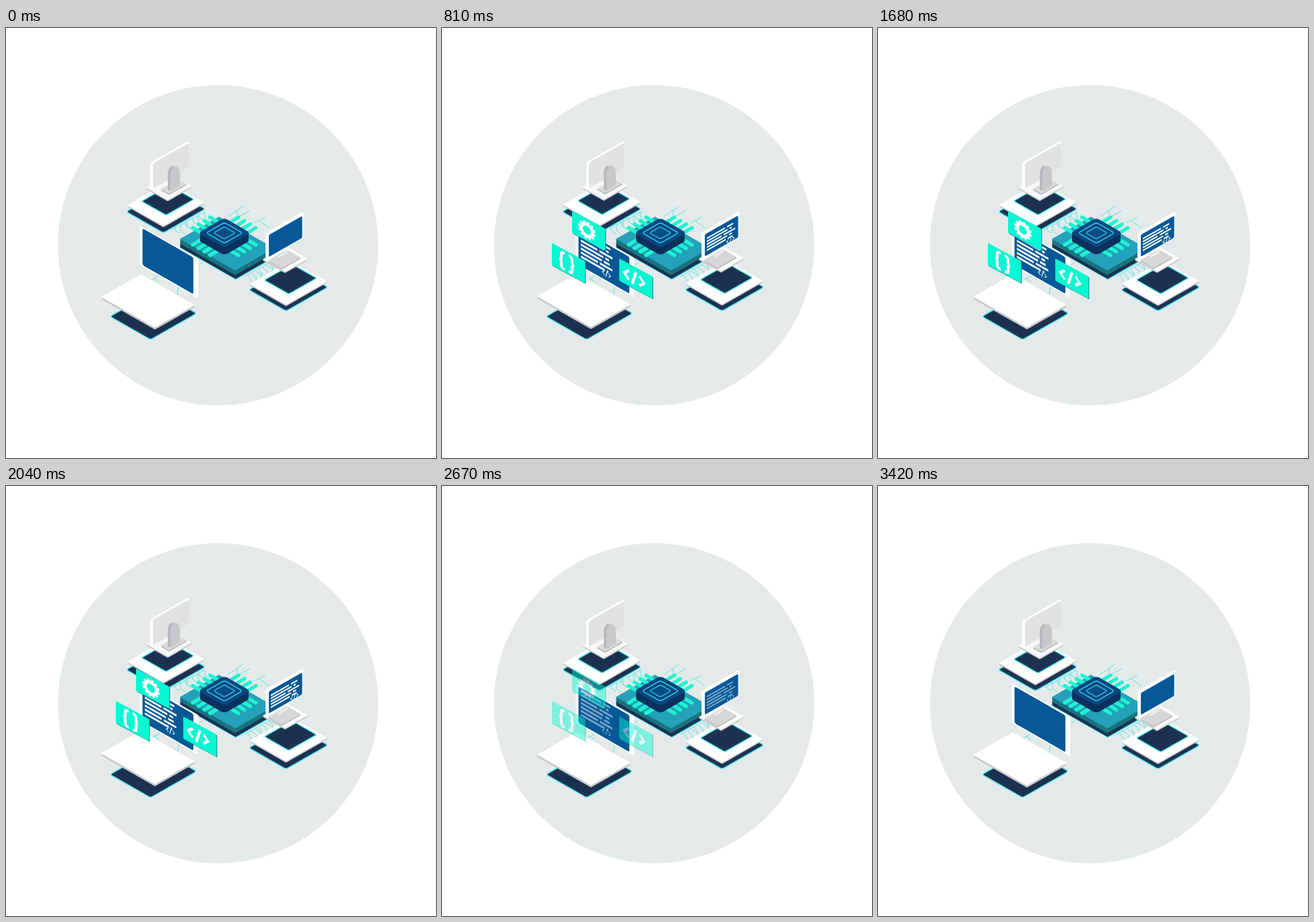
Write an HTML page that moves like this. It is 638x638 px and loops after 3600 ms.

```html
<!DOCTYPE html>
<html lang="en">
<head>
<meta charset="utf-8">
<title>Connected devices</title>
<style>
html, body { margin: 0; width: 100%; height: 100%; overflow: hidden; background: #fff; }
svg { display: block; width: 100vw; height: 100vh; }
rect { vector-effect: non-scaling-stroke; }
</style>
</head>
<body>
<svg id="stage" viewBox="0 0 638 638"></svg>
<script>
const LOOP = 3600, STEP = 30, K = .57;
const NAVY = '#1c3150', CYAN = '#35dfe6', MINT = '#06f8d3', BLUE = '#065897';
const WHITE = '#fff', EDGE = '#c8cacc';

const group = (cls, body, transform = '') => `<g class="${cls}" transform="${transform}">${body}</g>`;
const line = (d, stroke, w) =>
  `<path d="${d}" fill="none" stroke="${stroke}" stroke-width="${w}"/>`;
const rect = (x, y, w, h, r, fill, attrs = '') =>
  `<rect x="${x}" y="${y}" width="${w}" height="${h}" rx="${r}" fill="${fill}" ${attrs}/>`;
const skew = (x, y, k) => `matrix(1 ${k} 0 1 ${x} ${y})`;

// Flat isometric tile: left corner (x, y), a runs down-right, b runs up-right
const tile = (x, y, a, b, fill, stroke = 'none', r = 0) =>
  rect(0, 0, a, b, r, fill, `stroke="${stroke}" stroke-width="1.4" transform="matrix(1 ${K} 1 ${-K} ${x} ${y})"`);

// Tile with a side wall of height h
function slab(x, y, a, b, h, top, side, r = 0) {
  let out = '';
  for (let i = h; i > 0; i--) out += tile(x, y + i, a, b, side, 'none', r);
  return out + tile(x, y, a, b, top, 'none', r);
}

const lower = (x, y, a, b) => tile(x, y, a, b, NAVY, CYAN, 3);
const plate = (x, y) =>
  slab(x, y, 54, 61, 2, WHITE, EDGE, 1) + tile(x + 22, y - 6, 36, 41, NAVY, CYAN, 2);

// Icons
const TAG = 'M-7-6L-13 0L-7 6M7-6L13 0L7 6M2.5-9L-2.5 9';
const brace = 'M-3-12C-8-12-8-10-8-7V-4C-8-1-9 0-11 0C-9 0-8 1-8 4V7C-8 10-8 12-3 12';
const tag = (s, w) => group('', line(TAG, WHITE, w), `scale(${s})`);
const braces = line(brace, WHITE, 4.2) + group('', line(brace, WHITE, 4.2), 'scale(-1 1)');
const gear = `<circle r="8.5" fill="none" stroke="#fff" stroke-width="5"/>` +
  `<circle r="11.6" fill="none" stroke="#fff" stroke-width="3" stroke-dasharray="3.4 2.674"/>`;

// Code listing: each row is a long bar and a short one
function code(n, w, dy, h) {
  let d = '';
  for (let i = 0; i < n; i++) {
    const cut = w * (.64 + .12 * Math.sin(i * 2.3));
    const end = w * (.93 + .07 * Math.sin(i * 4));
    d += `M0 ${i * dy}H${cut}M${cut + 3} ${i * dy}H${end}`;
  }
  return line(d, WHITE, h);
}

function traces() {
  let d = '';
  for (let i = 0; i < 8; i++) {
    d += `M${247 + i * 6} ${299 - i * 3.2}l${4 + i % 3 * 2}-4v${5 + i % 2 * 4}l7 5`;
    d += `M${354 + i * 5.4} ${369 - i * 3}l4-3l${5 + i % 3 * 3} 7v${3 + i % 2 * 3}`;
  }
  d += 'M329 280L351 265M338 284L362 271M343 270V278M368 289L385 281M376 286L391 297' +
    'M212 376L230 366M219 371L227 376M254 396L256 384M284 353L292 348';
  return line(d, '#4ce6df', .9);
}

// Four pins on each side of the chip
function pins() {
  const at = (u, v) => `${324 + u + v} ${309 + (u - v) * .6}`;
  let d = '';
  for (let i = 0; i < 4; i++) {
    const p = -13 + i * 8.6;
    for (const s of [-1, 1]) {
      d += `M${at(p, s * 24)}L${at(p, s * 34)}M${at(s * 24, p)}L${at(s * 34, p)}`;
    }
  }
  return group('', `<path d="${d}" stroke="#1df5d1" stroke-width="5.4" stroke-linecap="round"/>`);
}

const board = () =>
  tile(259, 326, 82, 58, NAVY, CYAN) +
  slab(258, 320, 82, 58, 5, NAVY, NAVY) +
  slab(258, 313, 82, 58, 7, '#24a2ba', '#19747f') +
  pins() +
  slab(285, 304, 39, 39, 11, '#094680', '#0c315d', 5) +
  tile(297, 304, 27, 27, 'none', '#2bd5e4', 3) +
  tile(308, 304, 16, 16, '#074d85', '#2bbfd8', 2);

const backMonitor = () =>
  plate(179.5, 263) +
  slab(208, 237, 32, 36, 2, '#f6f7f8', EDGE) +
  group('', rect(0, 0, 57, 41, 3, WHITE) + rect(4, 3, 53, 38, 3, '#e1e2e2'), skew(214, 200, -K)) +
  slab(230, 239, 12, 26, 2, '#dadbdc', '#b9bbbd') +
  `<path d="M240 241V217Q241 205 249 204.5Q258 205 258 216V234L245 242Z" fill="#c7c8ca"/>` +
  line('M242 241V217Q242 209 247 206', '#b7b8bb', 4);

const frontMonitor = () =>
  plate(361.5, 380) +
  slab(381, 343, 33, 34, 2, '#fbfbfc', EDGE) +
  slab(389, 345, 20, 28, 2, '#d6d7d8', '#bcbec0') +
  line('M404 340L416 333V328', '#ededee', 3) +
  group('', rect(0, 0, 56, 39, 3, WHITE) + rect(5, 5.5, 49.5, 32.5, 2, BLUE) +
    group('extra', code(5, 42, 4.4, 2.3), 'translate(8 13)') +
    group('extra', tag(.42, 2.4), 'translate(43 35)'), skew(385, 304.5, -K));

const laptop = () =>
  slab(141, 399, 80, 59, 3, WHITE, EDGE) +
  group('', rect(1, 0, 87, 59, 3, '#dcdfe1') + rect(0, 0, 87, 59, 3, WHITE) +
    rect(4, 2.5, 75.5, 54.5, 2.5, BLUE) +
    group('extra', code(7, 47, 5.9, 3.1), 'translate(7.5 7.5)') +
    group('extra', tag(.46, 2.4), 'translate(45.5 47.5)'), skew(198.5, 292.5, K));

const card = (x, y, icon) => group('extra',
  rect(-24.2, -16, 49.5, 33, 1.5, '#155d70') + rect(-25, -16.5, 49.5, 33, 1.5, MINT) +
  group('', icon, 'translate(-3 .5)'), skew(x, y, .54));

const stage = document.getElementById('stage');
stage.innerHTML =
  `<circle cx="314.7" cy="322.3" r="237.6" fill="#e4eaea"/>` +
  lower(178.5, 272.5, 55, 62) + lower(360.5, 388.5, 55, 62) + lower(154.5, 428, 60, 68) +
  traces() +
  group('float', backMonitor()) +
  board() +
  group('float', frontMonitor()) +
  group('float', laptop()) +
  card(218, 301, gear) + card(188, 349, braces) + card(288, 372, tag(1.12, 3.4));

const floats = stage.querySelectorAll('.float');
const extras = stage.querySelectorAll('.extra');
const clamp = v => Math.min(1, Math.max(0, v));

// Four bobs between two rests; the code and cards fade in, then out
function draw(t) {
  const p = clamp((t - 120) / 3300);
  const lift = 1.5 * (1 - Math.cos(p * 8 * Math.PI));
  const show = clamp((t - 240) / 330) * clamp((2820 - t) / 330);
  floats.forEach(el => el.setAttribute('transform', `translate(0 ${-lift})`));
  extras.forEach(el => el.setAttribute('opacity', show));
}

const start = performance.now();
function tick() {
  const t = (performance.now() - start) % LOOP;
  draw(Math.floor(t / STEP) * STEP);
  requestAnimationFrame(tick);
}
tick();
</script>
</body>
</html>
```
